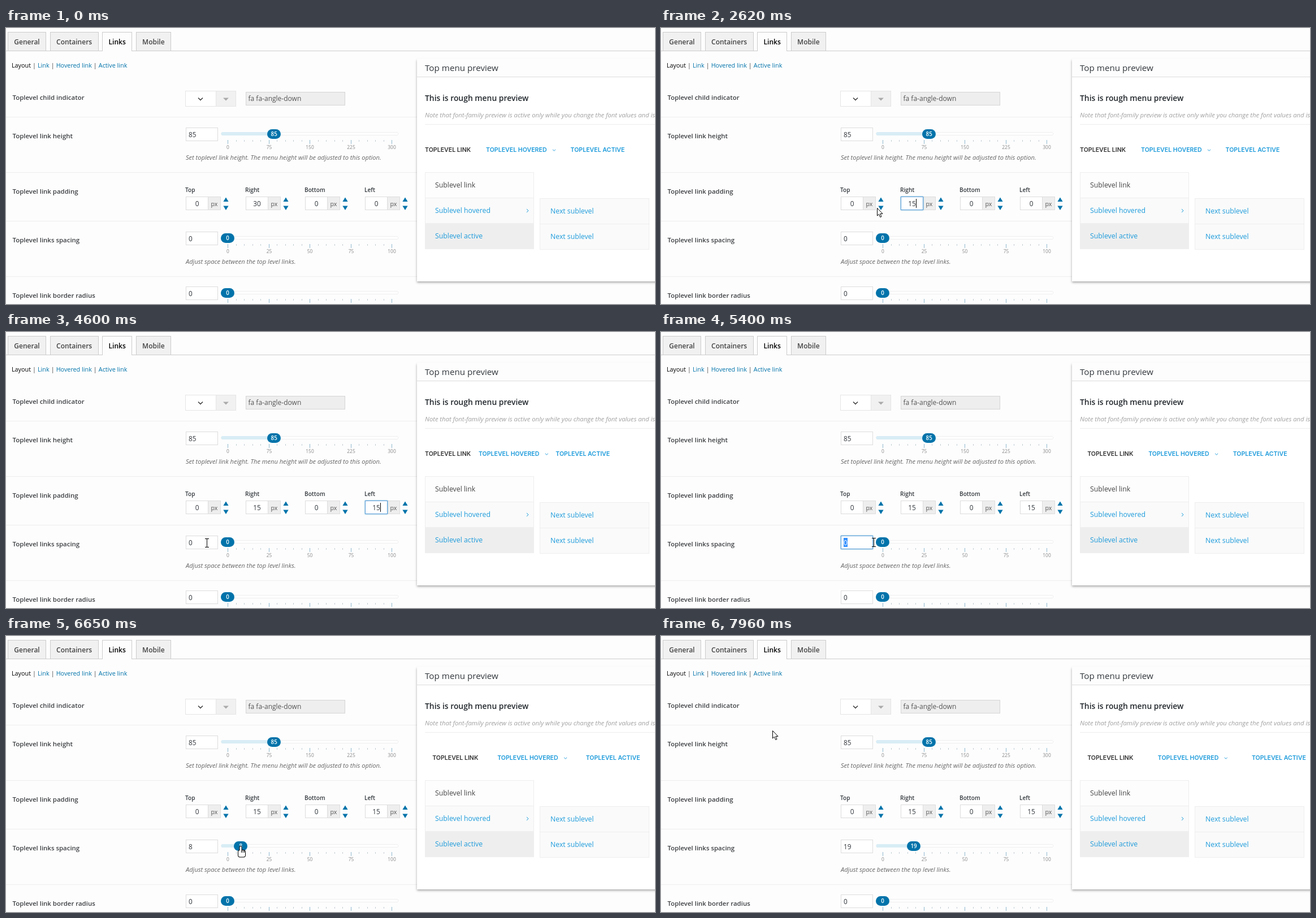
Animation of 1148 by 488 pixels, one loop 8000 ms. Source, as an HTML page with a canvas:

```html
<!DOCTYPE html>
<html lang="en">
<head>
<meta charset="utf-8">
<title>Menu link settings</title>
<style>
  html, body { margin: 0; width: 100%; height: 100%; overflow: hidden; background: #fdfdfd; }
  canvas { display: block; }
</style>
</head>
<body>
<canvas id="stage" width="1148" height="488"></canvas>
<script>
const ctx = document.getElementById('stage').getContext('2d');
const LOOP = 8000, FIRST = 40, STEP = 90;
const SANS = '"Open Sans", "Noto Sans", sans-serif';
const PAGE = '#fdfdfd', BLUE = '#0073aa', LINK = '#1d9bdb', LINE = '#ddd', FAINT = '#eee';
const PX = 0.875; // screen pixels per page pixel

const SLIDER_X = 392, SLIDER_W = 290, SPACING_Y = 371, FIELD_Y = 298;
const DRAG = { from: 5960, to: 7500, value: 19 };
const BLUR = { right: 2750, left: 4600, spacing: 5700 };

// Places the pointer visits: time, x, y.
const STOPS = [
  [40, 982, 472], [640, 335, 362], [940, 464, 316], [1300, 454, 312], [1500, 432, 312],
  [2000, 478, 320], [2560, 382, 318], [2830, 338, 327], [3300, 662, 318], [3730, 665, 320],
  [4200, 403, 384], [4600, 352, 372], [5350, 376, 372], [5500, 392, 372],
  [7690, 447, 372], [7960, 197, 167]
];

const clamp = k => Math.min(1, Math.max(0, k));
const ease = k => k * k * (3 - 2 * k);
const fieldX = i => Math.round(318 + i * 105.5);
const handleX = (value, max) => SLIDER_X + value / max * SLIDER_W;

function text(str, x, y, size, color, { weight = 400, style = 'normal', align = 'left', family = SANS } = {}) {
  ctx.font = `${style} ${weight} ${size}px ${family}`;
  ctx.textAlign = align;
  ctx.fillStyle = color;
  ctx.fillText(str, x, y);
  return ctx.measureText(str).width;
}

function rect(x, y, w, h, fill) {
  ctx.fillStyle = fill;
  ctx.fillRect(x, y, w, h);
}

function box(x, y, w, h, fill, stroke) {
  rect(x, y, w, h, stroke);
  rect(x + 1, y + 1, w - 2, h - 2, fill);
}

function shape(points, fill, stroke, width = 1) {
  ctx.beginPath();
  points.forEach(([x, y]) => ctx.lineTo(x, y));
  if (fill) { ctx.closePath(); ctx.fillStyle = fill; ctx.fill(); }
  if (stroke) { ctx.strokeStyle = stroke; ctx.lineWidth = width; ctx.stroke(); }
}

function triangle(x, y, half, height, color) {
  shape([[x - half, y], [x + half, y], [x, y + height]], color);
}

function chevron(x, y, w, h, color, width) {
  shape([[x - w, y - h], [x, y + h], [x + w, y - h]], null, color, width);
}

function pill(x, y, w, h, fill, stroke) {
  ctx.beginPath();
  ctx.roundRect(x, y, w, h, Math.min(w, h) / 2);
  if (stroke) { ctx.strokeStyle = stroke; ctx.stroke(); }
  ctx.fillStyle = fill;
  ctx.fill();
}

function input(x, y, w, { value, focus, selected }, centered) {
  const size = 11.8;
  ctx.save();
  if (focus) { ctx.shadowColor = 'rgba(30,140,190,.8)'; ctx.shadowBlur = 2; }
  rect(x, y, w, 24, focus ? '#5b9dd9' : LINE);
  ctx.restore();
  rect(x + 1, y + 1, w - 2, 22, '#fff');
  ctx.font = `400 ${size}px ${SANS}`;
  const width = ctx.measureText(value).width;
  const left = centered ? x + (w - width) / 2 : x + 5;
  if (selected) rect(Math.round(left), y + 4, Math.ceil(width), 16, '#3390ff');
  text(value, left, y + 16.5, size, selected ? '#fff' : '#32373c');
  if (focus && !selected) rect(Math.round(left + width), y + 4, 1, 16, '#000');
}

function drawTabs() {
  rect(0, 40, 1148, 1, '#ccc');
  let x = 3;
  for (const name of ['General', 'Containers', 'Links', 'Mobile']) {
    const active = name === 'Links';
    ctx.font = `600 12px ${SANS}`;
    const w = Math.round(ctx.measureText(name).width + 23);
    box(Math.round(x), 7, w, 34, active ? PAGE : '#f1f1f1', '#ccc');
    if (active) rect(Math.round(x) + 1, 40, w - 2, 1, PAGE);
    text(name, x + w / 2, 28.5, 12, active ? '#000' : '#444', { weight: 600, align: 'center' });
    x += w + 6.6;
  }

  x = 10;
  ['Layout', 'Link', 'Hovered link', 'Active link'].forEach((name, i) => {
    if (i) text('|', x - 6, 69.5, 10.8, '#444', { align: 'center' });
    x += text(name, x, 69.5, 10.8, i ? BLUE : '#000') + 12;
  });
}

function drawRow(top, name, hint) {
  if (top > 100) rect(0, top, 727, 1, FAINT);
  text('Toplevel ' + name, 11.5, top + 38, 11.45, '#3c3f42', { weight: 600 });
  if (hint) text(hint, 318, top + 76, 11.12, '#666', { style: 'italic' });
}

function drawRows() {
  drawRow(89, 'child indicator');
  drawRow(157, 'link height', 'Set toplevel link height. The menu height will be adjusted to this option.');
  drawRow(255, 'link padding');
  drawRow(341, 'links spacing', 'Adjust space between the top level links.');
  drawRow(439, 'link border radius');

  box(317, 111, 90, 28, '#fff', '#e5e5e5');
  box(371, 111, 36, 28, '#f1f1f1', '#e5e5e5');
  chevron(344, 125.5, 4, 2, '#333', 1.4);
  triangle(389, 123.5, 5, 5, '#aaa');
  box(424, 113, 176, 24, FAINT, '#d5d5d5');
  text('fa fa-angle-down', 428.5, 129, 12, '#555');
}

function slider(cy, max, value, state) {
  const hx = handleX(value, max);
  input(318, cy - 11, 57, { value: String(value), ...state });
  ctx.lineWidth = 1;
  pill(381, cy - 2.5, 312.5, 5, '#fff', LINE);
  if (value) pill(380.5, cy - 3, hx - 380, 6, '#d8edf6');
  for (let i = 0; i <= 20; i++) {
    const major = i % 5 === 0, x = Math.round(SLIDER_X + i * SLIDER_W / 20);
    rect(x, cy + 11, 1, major ? 7 : 3, major ? '#8fb8ce' : '#c0ccd2');
    if (major) text(String(max * i / 20), x + .5, cy + 26.5, 8.4, '#888', { align: 'center' });
  }
  pill(Math.round(hx) - 12, cy - 8, 24, 17, BLUE);
  text(String(value), hx, cy + 4, 9.8, '#fff', { weight: 600, align: 'center' });
}

function drawPadding(states) {
  ['Top', 'Right', 'Bottom', 'Left'].forEach((name, i) => {
    const x = fieldX(i);
    text(name, x - 1, 289.5, 10.1, '#32373c', { weight: 600 });
    box(x + 39, FIELD_Y, 23, 24, FAINT, LINE);
    text('px', x + 50.5, 314.5, 10.6, '#555', { align: 'center' });
    input(x, FIELD_Y, 40, states[name] || { value: '0' }, true);
    triangle(x + 71, 307, 4.6, -7.5, BLUE);
    triangle(x + 71, 314.5, 4.6, 7.5, BLUE);
  });
}

function drawPreview(padLeft, padRight, gap) {
  ctx.save();
  ctx.shadowColor = 'rgba(0,0,0,.35)';
  ctx.shadowBlur = 4;
  ctx.shadowOffsetY = 1.5;
  rect(727, 55, 440, 393, '#fff');
  ctx.restore();
  rect(727, 54, 421, 32, PAGE);
  rect(727, 86, 421, 1, LINE);
  text('Top menu preview', 741, 76, 15.2, '#32373c');
  text('This is rough menu preview', 741, 129, 13.9, '#23282d', { weight: 600 });
  text('Note that font-family preview is active only while you change the font values and is',
    741, 158, 11.28, '#a0a0a0', { style: 'italic' });
  rect(741, 170, 407, 1, FAINT);

  const nav = { weight: 600, family: 'Inter, sans-serif' };
  const hoverX = 849 - padRight + 2 * padLeft + gap;
  const activeX = 998.5 - 2 * padRight + 3 * padLeft + 2 * gap;
  text('TOPLEVEL LINK', 741 + padLeft, 219, 10.6, '#333', nav);
  text('TOPLEVEL HOVERED', hoverX, 219, 10.6, LINK, nav);
  text('TOPLEVEL ACTIVE', activeX, 219, 10.6, LINK, nav);
  chevron(hoverX + 120.5, 216, 2.5, 1.2, LINK, 1);

  box(741, 255, 193, 136, PAGE, FAINT);
  box(741, 300, 193, 46, '#fafafa', FAINT);
  rect(741, 345, 193, 45, FAINT);
  ['link', 'hovered', 'active'].forEach((name, i) =>
    text('Sublevel ' + name, 759, 282 + i * 45, 12.3, i ? LINK : '#444'));
  shape([[921, 320], [924, 323], [921, 326]], null, LINK);
  for (const y of [301, 346]) {
    box(944, y, 194, 46, '#fafafa', FAINT);
    text('Next sublevel', 963, y + 27, 12.28, LINK);
  }
}

function drawArrow() {
  shape([[.5, .5], [.5, 14], [3.5, 11.2], [5.8, 16.5], [8, 15.5], [5.8, 10.4], [10, 10.4], [.5, .5]], '#fff', '#000');
}

function drawBeam() {
  rect(0, -8, 1, 16, '#000');
  for (const y of [-8, 7]) rect(-3, y, 7, 1, '#000');
}

function drawHand() {
  ctx.beginPath();
  ctx.roundRect(-1.5, 0, 3, 12, 1.5);
  ctx.roundRect(-4, 7, 12, 11.5, 3);
  ctx.strokeStyle = '#000';
  ctx.lineWidth = 2;
  ctx.stroke();
  ctx.fillStyle = '#fff';
  ctx.fill();
  for (const x of [1.5, 4, 6.5]) rect(x - .5, 7, 1, 4, '#000');
}

function pointerAt(t) {
  const i = Math.max(1, STOPS.findIndex(stop => t <= stop[0]));
  const [t0, x0, y0] = STOPS[i - 1], [t1, x1, y1] = STOPS[i];
  const k = ease(clamp((t - t0) / (t1 - t0)));
  return [x0 + (x1 - x0) * k, y0 + (y1 - y0) * k];
}

function drawPointer(x, y, handle) {
  const inside = (left, top, w) => x >= left && x < left + w && y >= top && y < top + 24;
  const overInput = inside(318, SPACING_Y - 11, 60) || [0, 1, 2, 3].some(i => inside(fieldX(i), FIELD_Y, 40));
  const overHandle = Math.abs(x - handle) < 12 && Math.abs(y - SPACING_Y) < 9;
  ctx.save();
  ctx.translate(Math.round(x), Math.round(y));
  if (overInput) drawBeam();
  else if (overHandle) drawHand();
  else drawArrow();
  ctx.restore();
}

// A field that is clicked, selected, overtyped with 15 and left again.
function typedField(t, before, focusAt, selectAt, typeAt, blurAt) {
  const typed = Math.floor((t - typeAt) / 140) + 1;
  return {
    value: typed > 0 ? '15'.slice(0, typed) : before,
    focus: t >= focusAt && t < blurAt,
    selected: t >= selectAt && t < typeAt
  };
}

function draw(t) {
  const progress = clamp((t - DRAG.from) / (DRAG.to - DRAG.from));
  const spacing = Math.round(DRAG.value * progress);
  const handle = handleX(spacing, 100);

  rect(0, 0, 1148, 488, PAGE);
  drawTabs();
  drawRows();
  slider(187, 300, 85);
  drawPadding({
    Right: typedField(t, '30', 1250, 1450, 1900, BLUR.right),
    Left: typedField(t, '0', 3240, 3300, 3500, BLUR.left)
  });
  slider(SPACING_Y, 100, spacing, {
    focus: t >= BLUR.left && t < BLUR.spacing,
    selected: t >= 4850 && t < BLUR.spacing
  });
  slider(468, 100, 0);
  drawPreview(t >= BLUR.left ? 15 * PX : 0, t >= BLUR.right ? 15 * PX : 0, spacing * PX);

  if (t < FIRST) return;
  const [x, y] = pointerAt(t);
  const dragging = t > 5500 && t < 7690;
  drawPointer(dragging ? handle : x, y, handle);
}

const start = performance.now();
function tick() {
  const t = (performance.now() - start) % LOOP;
  draw(FIRST + Math.floor((t - FIRST) / STEP) * STEP);
  requestAnimationFrame(tick);
}
tick();
</script>
</body>
</html>
```
